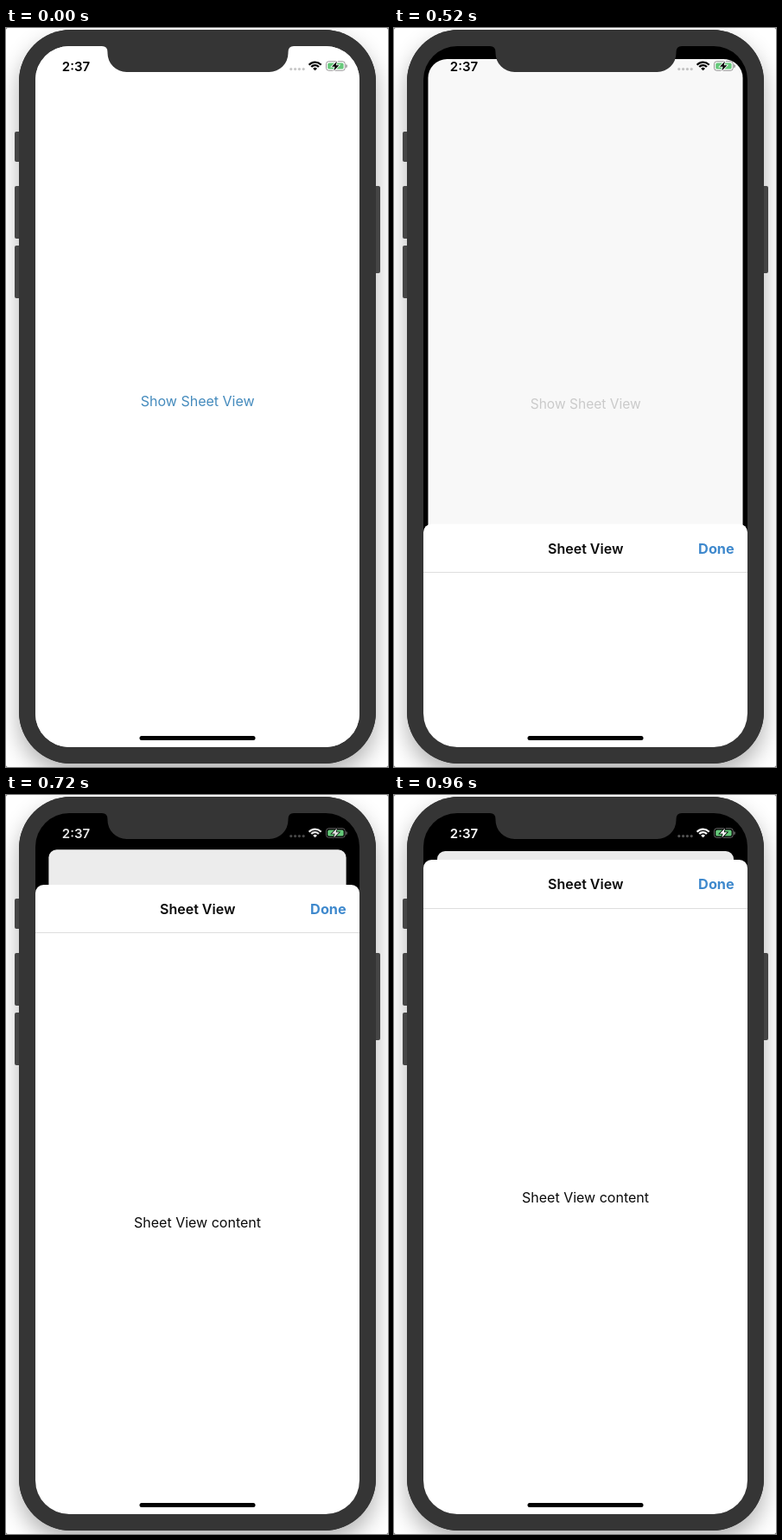
Write an HTML page with a canvas that moves like this. It is 442x856 px and loops after 1320 ms.

```html
<!DOCTYPE html>
<html lang="en">
<head>
<meta charset="utf-8">
<title>Sheet View</title>
<style>
  html, body { margin: 0; width: 100%; height: 100%; overflow: hidden; background: #fff; }
  canvas { display: block; }
</style>
</head>
<body>
<canvas id="stage" width="442" height="856"></canvas>
<script>
const ctx = document.getElementById('stage').getContext('2d');
const LOOP = 1320, STEP = 40;
const SCREEN = { x: 34, y: 21, w: 375, h: 812, r: 39 };
const SHEET_TOP = 74.5;
const FONT = 'Inter, Roboto, sans-serif';

const clamp = v => Math.max(0, Math.min(1, v));
const lerp = (a, b, u) => a + (b - a) * u;
const rgb = (r, g, b) => `rgb(${Math.round(r)},${Math.round(g)},${Math.round(b)})`;
const gray = (v, a = 1) => `rgba(${Math.round(v)},${Math.round(v)},${Math.round(v)},${a})`;

function box(x, y, w, h, r, fill) {
  ctx.beginPath();
  ctx.roundRect(x, y, w, h, r);
  ctx.fillStyle = fill;
  ctx.fill();
}

function text(str, x, y, size, weight, fill, align = 'center') {
  ctx.font = `${weight} ${size}px ${FONT}`;
  ctx.textAlign = align;
  ctx.fillStyle = fill;
  ctx.fillText(str, x, y);
}

// Critically damped spring, 0 to 1
function spring(t) {
  const k = Math.max(0, t - 457) * 0.0192;
  return 1 - (1 + k) * Math.exp(-k);
}

function buttonColor(t) {
  if (t < 400) return rgb(69, 139, 189);
  const u = clamp((t - 400) / 120);
  return rgb(lerp(115, 202, u), lerp(166, 202, u), lerp(204, 202, u));
}

function drawPhone() {
  box(0, 0, 442, 856, 0, '#555');
  box(0, 0, 442, 856, 2, '#fff');
  ctx.save();
  ctx.shadowColor = 'rgba(0,0,0,0.3)';
  ctx.shadowBlur = 26;
  ctx.shadowOffsetY = 12;
  box(15, 2, 413, 850, 60, '#353535');
  ctx.restore();
  for (const [x, y, h] of [[10, 120, 35], [10, 183, 61], [10, 252, 61], [425, 183, 101]])
    box(x, y, 8, h, 2, '#454545');
  box(15, 2, 413, 850, 60, '#353535');
}

function drawCard(t, p) {
  const s = 1 - 32 * p / SCREEN.w;
  const r = p > 0 ? 10 + 29 * (1 - p) ** 2 : 0;
  ctx.save();
  ctx.translate(SCREEN.x + 16 * p, SCREEN.y + 44 * p);
  ctx.scale(s, s);
  box(0, 0, SCREEN.w, SCREEN.h, r, gray(255 - 20 * p));
  text('Show Sheet View', 187.7, 417.3, 16, 400, buttonColor(t));
  ctx.restore();
}

function drawSheet(p) {
  const y = lerp(SCREEN.y + SCREEN.h, SHEET_TOP, p);
  box(SCREEN.x, y, SCREEN.w, SCREEN.h, 9.5, '#fff');
  text('Sheet View', 221.7, y + 34.3, 16, 600, '#0a0a0a');
  text('Done', 393.7, y + 34.3, 16.3, 700, '#3f89cd', 'right');
  box(SCREEN.x, Math.round(y + 55.5), SCREEN.w, 1, 0, '#dedede');
  text('Sheet View content', 221.5, y + 397, 16, 400, '#0a0a0a');
}

function drawWifi(color) {
  const cx = 357.6, cy = 49.2, a = Math.PI * 0.26;
  ctx.strokeStyle = ctx.fillStyle = color;
  ctx.lineWidth = 2.2;
  for (const r of [9.6, 6]) {
    ctx.beginPath();
    ctx.arc(cx, cy, r, -Math.PI / 2 - a, -Math.PI / 2 + a);
    ctx.stroke();
  }
  ctx.beginPath();
  ctx.moveTo(cx, cy);
  ctx.arc(cx, cy, 3.3, -Math.PI / 2 - a, -Math.PI / 2 + a);
  ctx.fill();
}

function drawBattery(v) {
  ctx.beginPath();
  ctx.roundRect(370.5, 38.7, 21.8, 10.6, 3);
  ctx.strokeStyle = gray(v, 0.4);
  ctx.lineWidth = 1;
  ctx.stroke();
  box(393.3, 42.2, 1.4, 3.8, [0, 1, 1, 0], gray(v, 0.45));
  box(372.2, 40.4, 18.4, 7.2, 1.6, '#65c97a');
  ctx.beginPath();
  ctx.moveTo(383, 38.6);
  ctx.lineTo(377, 44.7);
  ctx.lineTo(380.6, 44.7);
  ctx.lineTo(379.3, 49.6);
  ctx.lineTo(385.4, 43.2);
  ctx.lineTo(381.7, 43.2);
  ctx.closePath();
  ctx.strokeStyle = gray(255 - v);
  ctx.lineWidth = 1.6;
  ctx.stroke();
  ctx.fillStyle = gray(v);
  ctx.fill();
}

function drawStatus(t) {
  const v = 255 * Math.sin(Math.PI / 2 * clamp((t - 520) / 280));
  text('2:37', 81, 49.5, 15, 600, gray(v));
  for (let i = 0; i < 4; i++)
    box(328.2 + i * 4.8, 46, 3.2, 3.2, 1.6, gray(v, 0.22 + v / 2550));
  drawWifi(gray(v));
  drawBattery(v);
}

function drawNotch() {
  ctx.beginPath();
  ctx.moveTo(111, 20);
  ctx.lineTo(111, 21);
  ctx.quadraticCurveTo(117.5, 21, 117.5, 28);
  ctx.arcTo(117.5, 51, 140, 51, 22);
  ctx.arcTo(326.5, 51, 326.5, 28, 22);
  ctx.lineTo(326.5, 28);
  ctx.quadraticCurveTo(326.5, 21, 333, 21);
  ctx.lineTo(333, 20);
  ctx.fillStyle = '#353535';
  ctx.fill();
}

function draw(t) {
  const p = spring(t);
  drawPhone();
  ctx.save();
  ctx.beginPath();
  ctx.roundRect(SCREEN.x, SCREEN.y, SCREEN.w, SCREEN.h, SCREEN.r);
  ctx.clip();
  box(SCREEN.x, SCREEN.y, SCREEN.w, SCREEN.h, 0, p > 0 ? '#000' : '#fff');
  drawCard(t, p);
  if (p > 0) drawSheet(p);
  drawStatus(t);
  ctx.restore();
  drawNotch();
  box(154.5, 820, 134, 5, 2.5, '#000');
}

function tick() {
  const t = performance.now() % LOOP;
  draw(Math.min(960, Math.floor(t / STEP) * STEP));
  requestAnimationFrame(tick);
}
tick();
</script>
</body>
</html>
```
